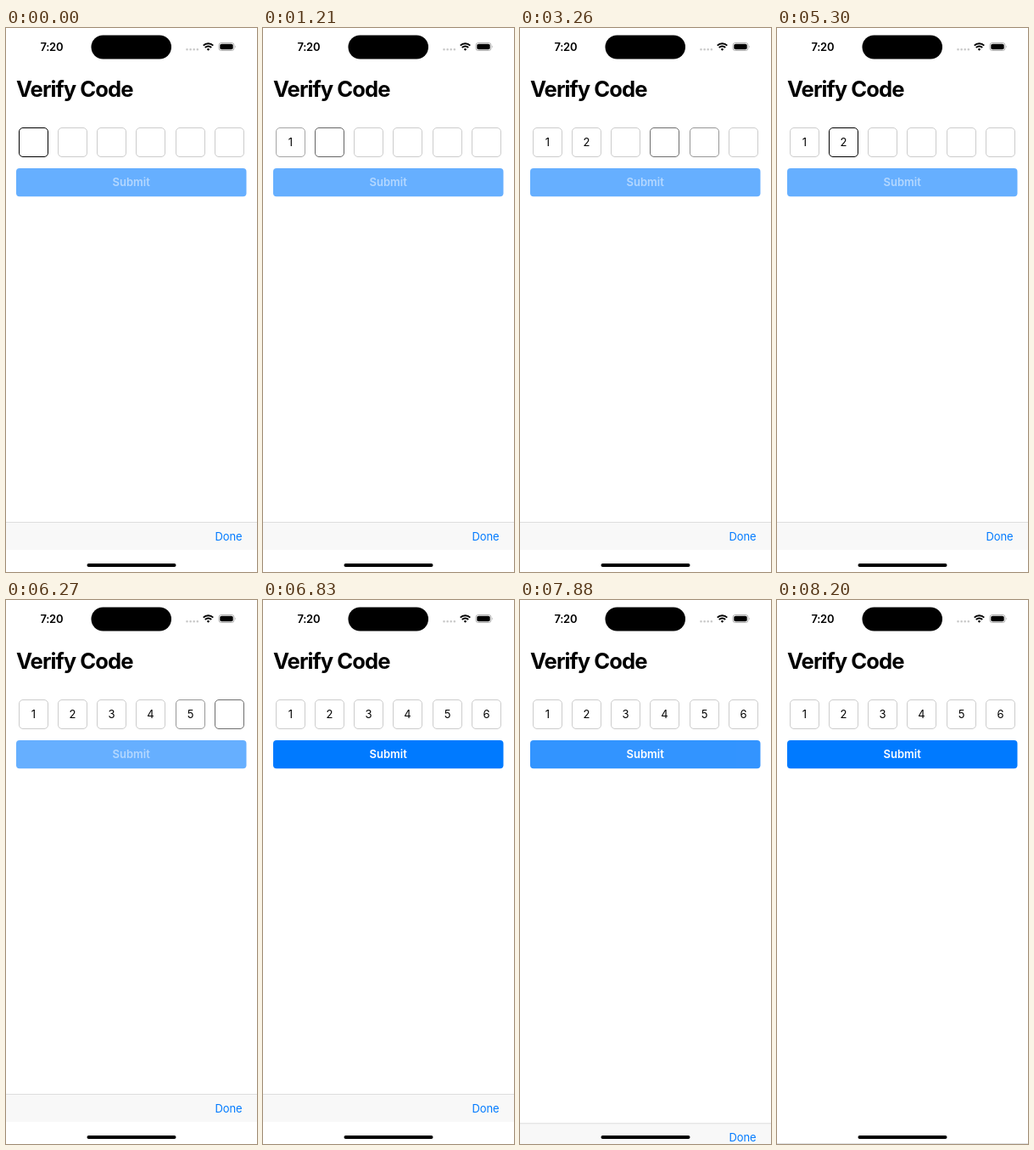
These frames come from a looping animation (296 by 640 pixels, 8.27 s). An HTML page:

```html
<!DOCTYPE html>
<html lang="en">
<head>
<meta charset="utf-8">
<title>Verify Code</title>
<style>
  html, body { margin: 0; height: 100%; overflow: hidden; background: #fff; }
  svg { display: block; width: 296px; height: 640px; font: 13px Inter, Roboto, sans-serif; }
  .bold { font-weight: 600; }
  .title { font-size: 25.6px; font-weight: 700; letter-spacing: -.95px; }
  .mid { text-anchor: middle; }
</style>
</head>
<body>
<svg viewBox="0 0 296 640">
  <text class="bold" x="40.5" y="26.5" letter-spacing="-.3">7:20</text>
  <rect x="100.5" y="8.5" width="94.5" height="28" rx="14"/>
  <path d="M213.5 25.3h14" stroke="#c8c8c8" stroke-width="2.6" stroke-linecap="round" stroke-dasharray="0 4.1"/>
  <g fill="none" stroke="#000" stroke-width="1.9">
    <path d="M232.7 20.6a8.2 8.2 0 0 1 11.6 0M234.8 23a5.2 5.2 0 0 1 7.4 0"/>
    <path d="M236.8 24.9L238.5 26.7L240.2 24.9A2.4 2.4 0 0 0 236.8 24.9Z" fill="#000" stroke="none"/>
  </g>
  <rect x="251" y="17.5" width="18" height="9" rx="2.8" fill="none" stroke="#a6a6a6" stroke-width=".9"/>
  <rect x="252.3" y="18.8" width="15.4" height="6.4" rx="1.8"/>
  <path d="M270.4 20.6q1.5 1.4 0 2.9z" fill="#a6a6a6"/>

  <text class="title" x="12" y="80.7">Verify Code</text>
  <g id="cells"></g>

  <g id="button">
    <rect x="12" y="165" width="271.5" height="33.3" rx="4" fill="#007aff"/>
    <text class="bold mid" x="147.7" y="186.4" fill="#fff">Submit</text>
  </g>

  <g id="bar">
    <rect y="581" width="296" height="33" fill="#f8f8f8"/>
    <rect y="581" width="296" height="1" fill="#dedede"/>
    <text x="246.5" y="603" fill="#007aff" letter-spacing="-.15">Done</text>
  </g>
  <rect x="95.5" y="630" width="105" height="4" rx="2"/>
</svg>
<script>
const LOOP = 8270, FADE_IN = 240, FADE_OUT = 150;
const PRESS = 7660, RELEASE = 7770;
// [time, number of digits entered from then on]
const edits = [
  [1090, 1], [1480, 2], [1820, 3], [2220, 4],
  [3150, 3], [3260, 2], [3480, 1],
  [5300, 2], [5550, 3], [5830, 4], [6160, 5], [6370, 6]
];

const $ = id => document.getElementById(id);
const clamp = v => Math.max(0, Math.min(1, v));
const easeOut = v => 1 - (1 - clamp(v)) ** 3;

$('cells').innerHTML = [...'123456'].map((digit, i) => {
  const x = Math.round(14.8 + 46.2 * i) + .5;
  return `<rect x="${x}" y="117.5" width="34" height="34" rx="4.5" fill="none"/>
    <text class="mid" x="${x + 17}" y="139.3">${digit}</text>`;
}).join('');
const boxes = document.querySelectorAll('#cells rect');
const digits = document.querySelectorAll('#cells text');
const face = document.querySelector('#button rect');
const label = document.querySelector('#button text');

function draw(t) {
  let count = 0;
  const focus = [1, 0, 0, 0, 0, 0];
  for (const [start, next] of edits) {
    if (t < start) break;
    focus[count] *= 1 - clamp((t - start) / FADE_OUT);
    if (next < 6) focus[next] = Math.max(focus[next], clamp((t - start) / FADE_IN));
    count = next;
  }
  boxes.forEach((box, i) => {
    const v = Math.round(204 * (1 - focus[i]));
    box.setAttribute('stroke', `rgb(${v},${v},${v})`);
    digits[i].setAttribute('opacity', i < count ? 1 : 0);
  });

  const ready = count === 6;
  face.setAttribute('opacity', ready ? 1 : .6);
  label.setAttribute('opacity', ready ? 1 : .5);
  $('button').setAttribute('opacity', t < PRESS ? 1 : .2 + .8 * easeOut((t - RELEASE) / 300));
  $('bar').setAttribute('transform', `translate(0 ${58 * easeOut((t - RELEASE) / 430)})`);
}

function tick() {
  draw(performance.now() % LOOP);
  requestAnimationFrame(tick);
}
tick();
</script>
</body>
</html>
```
